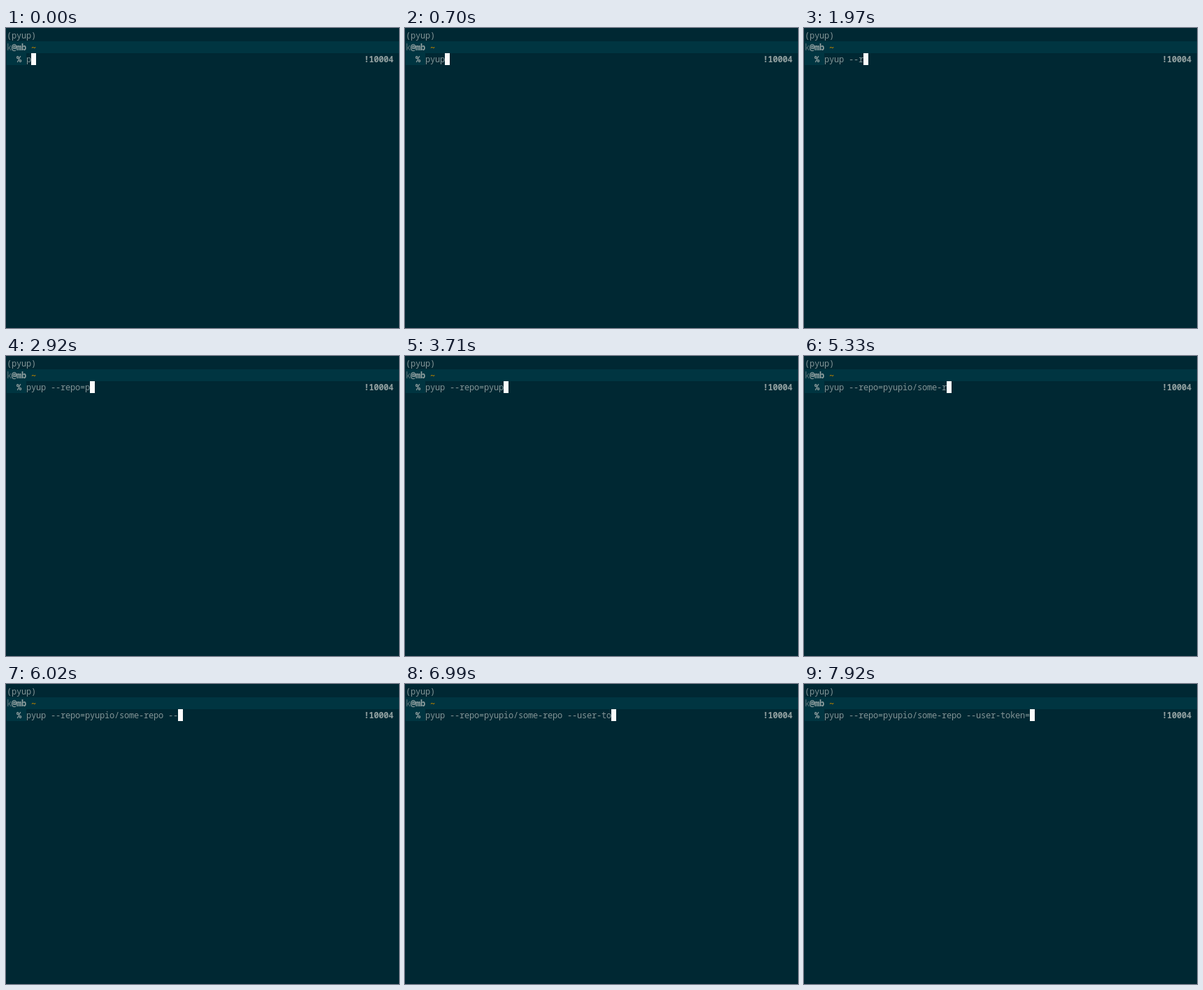
An HTML page with a canvas for the animation above (8000 ms loop, 562 px wide and 429 px high).

```html
<!DOCTYPE html>
<html lang="en">
<head>
<meta charset="utf-8">
<title>Terminal typing</title>
<style>
  html, body { margin: 0; width: 100%; height: 100%; overflow: hidden; background: #002833; }
  canvas { display: block; }
</style>
</head>
<body>
<canvas id="term" width="562" height="429"></canvas>
<script>
const ctx = document.getElementById('term').getContext('2d');
const LOOP = 8000, CELL = 7, ROW = 17, LEFT = 1, TOP = 2;
const BG = '#002833', BAND = '#003541', DIM = '#5c7076', TEXT = '#839496',
      BRIGHT = '#93a1a1', GOLD = '#b58000', CURSOR = '#fcfcfc';

// Typing bursts: start, end, keys ('<' is a backspace)
const bursts = [
  [330, 330, 'y'], [580, 700, 'up'], [1480, 1480, ' '], [1730, 1730, '-'],
  [1870, 1970, '-r'], [2030, 2300, 'epo0'], [2500, 2500, '<'],
  [2820, 2920, '=p'], [3290, 3290, 'y'], [3600, 3710, 'up'], [3860, 3860, 'i'],
  [4260, 4350, 'o/'], [4510, 4510, 's'], [4950, 5330, 'ome-r'],
  [5470, 5840, 'epo -'], [6020, 6120, '-u'], [6280, 6630, 'ser-t'],
  [6990, 6990, 'o'], [7110, 7420, 'ken0'], [7620, 7620, '<'], [7920, 7920, '=']
];

const keys = bursts.flatMap(([from, to, text]) => [...text].map((key, i) => ({
  key, at: from + (to - from) * i / Math.max(1, text.length - 1)
})));

function typedAt(t) {
  let line = 'p';
  for (const { key, at } of keys) {
    if (at > t + 0.01) break;
    line = key === '<' ? line.slice(0, -1) : line + key;
  }
  return line;
}

const colX = col => LEFT + col * CELL;
const rowY = row => TOP + row * ROW;

function fillCells(row, x, width, color) {
  ctx.fillStyle = color;
  ctx.fillRect(x, rowY(row), width, ROW);
}

function write(row, col, text, color, weight = 500) {
  ctx.font = weight + ' 12px "Noto Sans Mono", "DejaVu Sans Mono", monospace';
  ctx.fillStyle = color;
  [...text].forEach((ch, i) => ctx.fillText(ch, colX(col + i), rowY(row) + 13));
}

function draw(t) {
  const line = typedAt(t);
  ctx.fillStyle = BG;
  ctx.fillRect(0, 0, 562, 429);

  write(0, 0, '(pyup)', TEXT);

  fillCells(1, LEFT, 562 - LEFT, BAND);
  write(1, 0, 'k', DIM);
  write(1, 1, '@mb', BRIGHT, 600);
  write(1, 5, '~', GOLD, 700);

  fillCells(2, LEFT, 4 * CELL, BAND);
  write(2, 2, '%', BRIGHT, 600);
  write(2, 4, line, TEXT);
  write(2, 73, '!10004', BRIGHT, 600);
  fillCells(2, colX(4 + line.length), CELL, CURSOR);
}

const start = performance.now();
function frame() {
  draw((performance.now() - start) % LOOP);
  requestAnimationFrame(frame);
}
frame();
</script>
</body>
</html>
```
